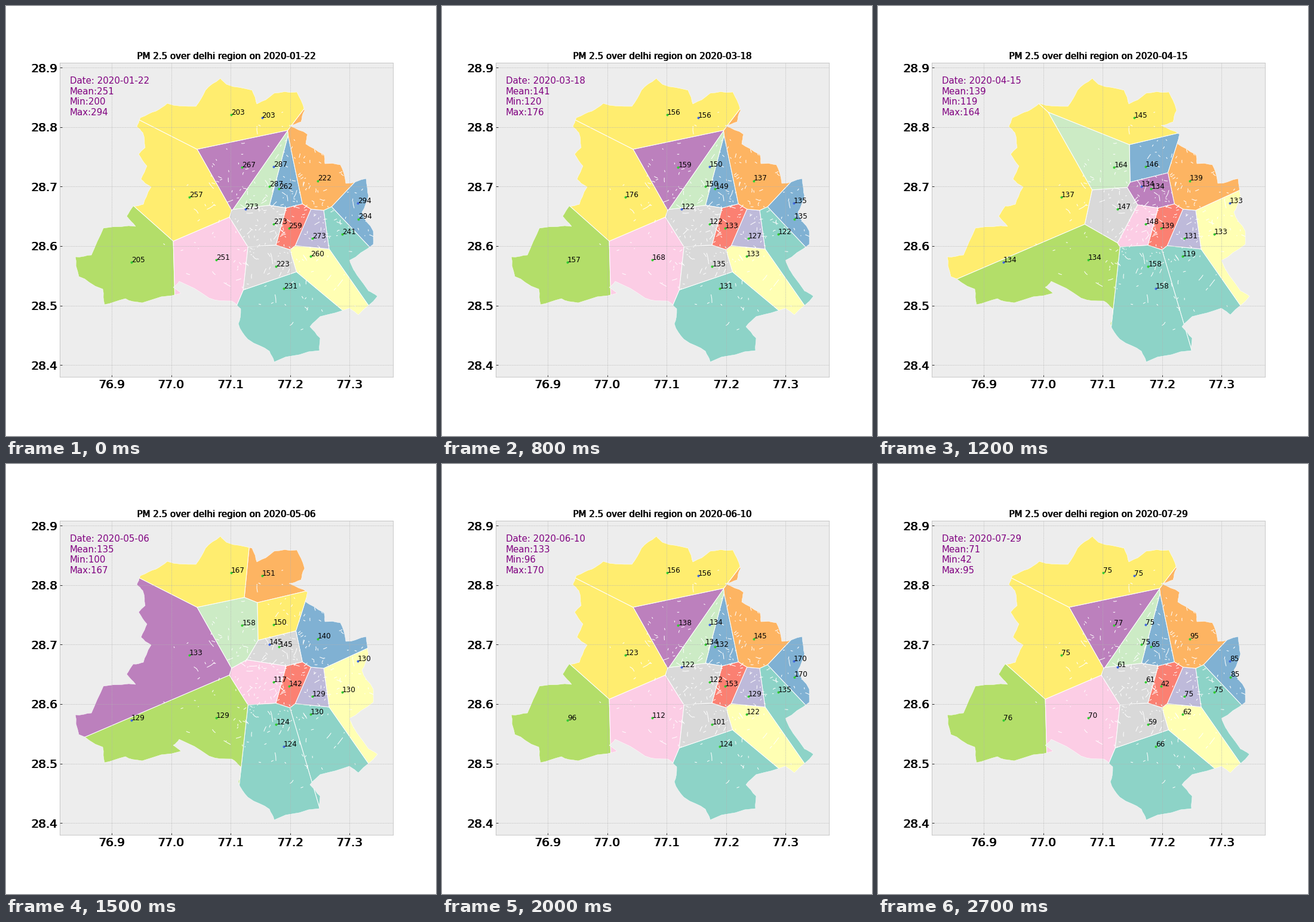
Write a matplotlib script that moves like this. It is 720 by 720 pixels and loops after 2.8 s.

```python
import numpy as np
import matplotlib.pyplot as plt
from matplotlib.animation import FuncAnimation
from matplotlib.collections import LineCollection
from matplotlib.patches import Polygon

plt.rcParams["font.family"] = "DejaVu Sans"
rng = np.random.default_rng(7)
FRAMES = 28
SET3 = plt.get_cmap("Set3").colors

# Key points of the region's border in stage pixels; roughen() adds the detail.
BORDER = [
    (219, 202), (225, 187), (251, 176), (270, 163), (318, 168), (334, 141),
    (359, 121), (369, 131), (412, 141), (420, 164), (449, 146), (487, 144),
    (500, 175), (494, 194), (474, 200), (505, 215), (502, 231), (533, 249),
    (534, 264), (560, 266), (569, 297), (603, 289), (607, 318), (596, 345),
    (615, 377), (615, 399), (575, 426), (607, 477), (622, 486), (590, 517),
    (575, 506), (526, 520), (509, 537), (526, 556), (525, 577), (449, 596),
    (441, 578), (405, 558), (389, 532), (393, 507), (378, 494), (340, 489),
    (290, 461), (280, 471), (293, 481), (228, 497), (200, 490), (165, 500),
    (162, 474), (122, 453), (116, 420), (143, 417), (163, 372), (217, 369),
    (202, 352), (213, 335), (230, 332), (243, 303), (226, 290), (236, 268),
    (222, 248), (233, 237), (229, 212),
]

SITES = np.array([
    (377, 182), (428.6, 187), (395.4, 270), (307, 320), (448, 269),
    (441, 301.7), (457.2, 306), (522, 292.5), (400.5, 340), (448, 365),
    (473.5, 372), (513, 389), (563, 382), (590, 356.5), (589, 330),
    (510, 419), (452.4, 436), (465, 473), (352, 425), (210, 429),
])

# Reporting sites of each layout, in colour order.
LAYOUTS = [
    [12, 17, 15, 11, 10, 6, 13, 7, 19, 18, 9, 16, 2, 5, 3, 0],
    [15, 16, 12, 11, 10, 4, 7, 18, 9, 8, 6, 2, 1, 3],
    [15, 16, 12, 11, 10, 7, 1, 18, 9, 6, 3, 2, 0, 4],
]
SILENT = [[1, 4, 8, 14], [5, 14, 17, 19], [5, 14, 17, 19]]

# Readings of the reporting sites in a few key weeks.
READINGS = {
    0: [241, 231, 260, 273, 259, 262, 294, 222, 205, 251, 273, 223, 267, 287, 257, 203],
    3: [212, 218, 229, 225, 183, 254, 231, 221, 217, 261, 215, 216, 273, 252, 267, 241],
    8: [122, 131, 133, 127, 133, 149, 135, 137, 157, 168, 122, 135, 159, 150, 176, 156],
    12: [119, 158, 133, 131, 139, 146, 139, 134, 148, 147, 134, 164, 145, 137],
    15: [130, 124, 130, 129, 142, 140, 151, 129, 117, 145, 133, 158, 167, 150],
    20: [135, 124, 122, 129, 153, 132, 170, 145, 96, 112, 122, 101, 138, 134, 123, 156],
    27: [75, 66, 62, 75, 42, 65, 85, 95, 76, 70, 61, 59, 77, 75, 75, 75],
}
WEEKS = list(READINGS)
STATS = {
    "Mean": (251, 232, 141, 139, 135, 133, 71),
    "Min": (200, 183, 120, 119, 100, 96, 42),
    "Max": (294, 277, 176, 164, 167, 170, 95),
}


def layout_at(week):
    if week < 11 or week >= 17:
        return 0
    return 1 if week < 14 else 2


def reading(site, week):
    known = {}
    for w, values in READINGS.items():
        ids = LAYOUTS[layout_at(w)]
        if site in ids:
            known[w] = values[ids.index(site)]
    return np.interp(week, list(known), list(known.values()))


def nearest(site, ids):
    return ids[np.hypot(*(SITES[ids] - SITES[site]).T).argmin()]


def roughen(points):
    """Add a shifted midpoint to every side of a closed line."""
    out = []
    for a, b in zip(points, np.roll(points, -1, axis=0)):
        shift = 0.06 * np.hypot(*(b - a))
        out += [a, (a + b) / 2 + rng.uniform(-shift, shift, 2)]
    return np.array(out)


def nearer(poly, site, other):
    """Part of poly closer to site than to other."""
    side = (poly - (site + other) / 2) @ (other - site)
    out = []
    for k in range(len(poly)):
        p, q, s, t = poly[k - 1], poly[k], side[k - 1], side[k]
        if s * t < 0:
            out.append(p + (q - p) * s / (s - t))
        if t <= 0:
            out.append(q)
    return np.array(out)


def voronoi_cell(i, ids):
    poly = np.array([(0, 0), (720, 0), (720, 720), (0, 720)], float)
    for j in ids:
        if j != i:
            poly = nearer(poly, SITES[i], SITES[j])
    return poly


def street():
    """Short bent line; streets thin out away from the city centre."""
    start = rng.normal((475, 360), (75, 72))
    angle = rng.uniform(0, np.pi)
    step = (1 + min(rng.exponential(1.5), 6)) * np.array([np.cos(angle), np.sin(angle)])
    return [start, start + step, start + 2 * step + rng.normal(0, 0.7, 2)]


fig = plt.figure(figsize=(10, 10), dpi=72, facecolor="white")
ax = fig.add_axes([90 / 720, 99 / 720, 558 / 720, 526 / 720])
ax.set(xlim=(90, 648), ylim=(621, 95), facecolor="#ededed")
for spine in ax.spines.values():
    spine.set(color="#bcbcbc", linewidth=0.8)


def heavy(x, y, s, **kw):
    """Text printed twice, a pixel apart, so that it looks heavier."""
    return [ax.text(x + dx, y, s, **kw) for dx in (-0.5, 0.5)]


x_ticks = 176.9 + 99.63 * np.arange(5)
y_ticks = 103.05 + 99.63 * np.arange(6)
ax.set_xticks(x_ticks)
ax.set_yticks(y_ticks)
ax.tick_params(direction="in", length=3.5, labelbottom=False, labelleft=False)
ax.grid(color="#b2b2b2", linestyle="--", linewidth=0.5)
ax.set_axisbelow("line")
for k, x in enumerate(x_ticks):
    heavy(x, 624.5, f"{76.9 + k / 10:.1f}", size=20, ha="center", va="top")
for k, y in enumerate(y_ticks):
    heavy(86.5, y, f"{28.9 - k / 10:.1f}", size=20, ha="right", va="center_baseline")

border = roughen(roughen(np.array(BORDER, float)))
outline = ax.add_patch(Polygon(border, fc="none", ec="white", lw=0.5, zorder=1.2))

cells = []
for ids in LAYOUTS:
    group = []
    for k, i in enumerate(ids):
        colour = SET3[min(12 * k // (len(ids) - 1), 11)]
        cell = ax.add_patch(Polygon(voronoi_cell(i, ids), fc=colour, ec="white", lw=1))
        cell.set_clip_path(outline)
        group.append(cell)
    cells.append(group)

streets = ax.add_collection(LineCollection(
    [street() for _ in range(330)], colors="white", linewidths=1, zorder=1.1))
streets.set_clip_path(outline)

live, = ax.plot([], [], "o", ms=4, mew=0, color="limegreen", zorder=2)
silent, = ax.plot([], [], "o", ms=4, mew=0, color="royalblue", zorder=2)
labels = [ax.text(x, y, "", size=12) for x, y in SITES]
titles = heavy(369, 89, "", size=15, ha="center")
summary = ax.text(107, 118.5, "", size=15, color="purple", va="top")


def draw(week):
    date = str(np.datetime64("2020-01-22") + 7 * week)
    for t in titles:
        t.set_text(f"PM 2.5 over delhi region on {date}")
    stats = [f"{k}:{np.interp(week, WEEKS, v):.0f}" for k, v in STATS.items()]
    summary.set_text("\n".join([f"Date: {date}"] + stats))

    shown = layout_at(week)
    for k, group in enumerate(cells):
        for cell in group:
            cell.set_visible(k == shown)
    ids, quiet = LAYOUTS[shown], SILENT[shown]
    live.set_data(*SITES[ids].T)
    silent.set_data(*SITES[quiet].T)
    # A silent site takes the value of the nearest reporting one.
    for i, label in enumerate(labels):
        used = i in ids or i in quiet
        label.set_text(f"{reading(nearest(i, ids), week):.0f}" if used else "")
    return []


anim = FuncAnimation(fig, draw, frames=FRAMES, interval=100, repeat=True)
plt.show()
```
